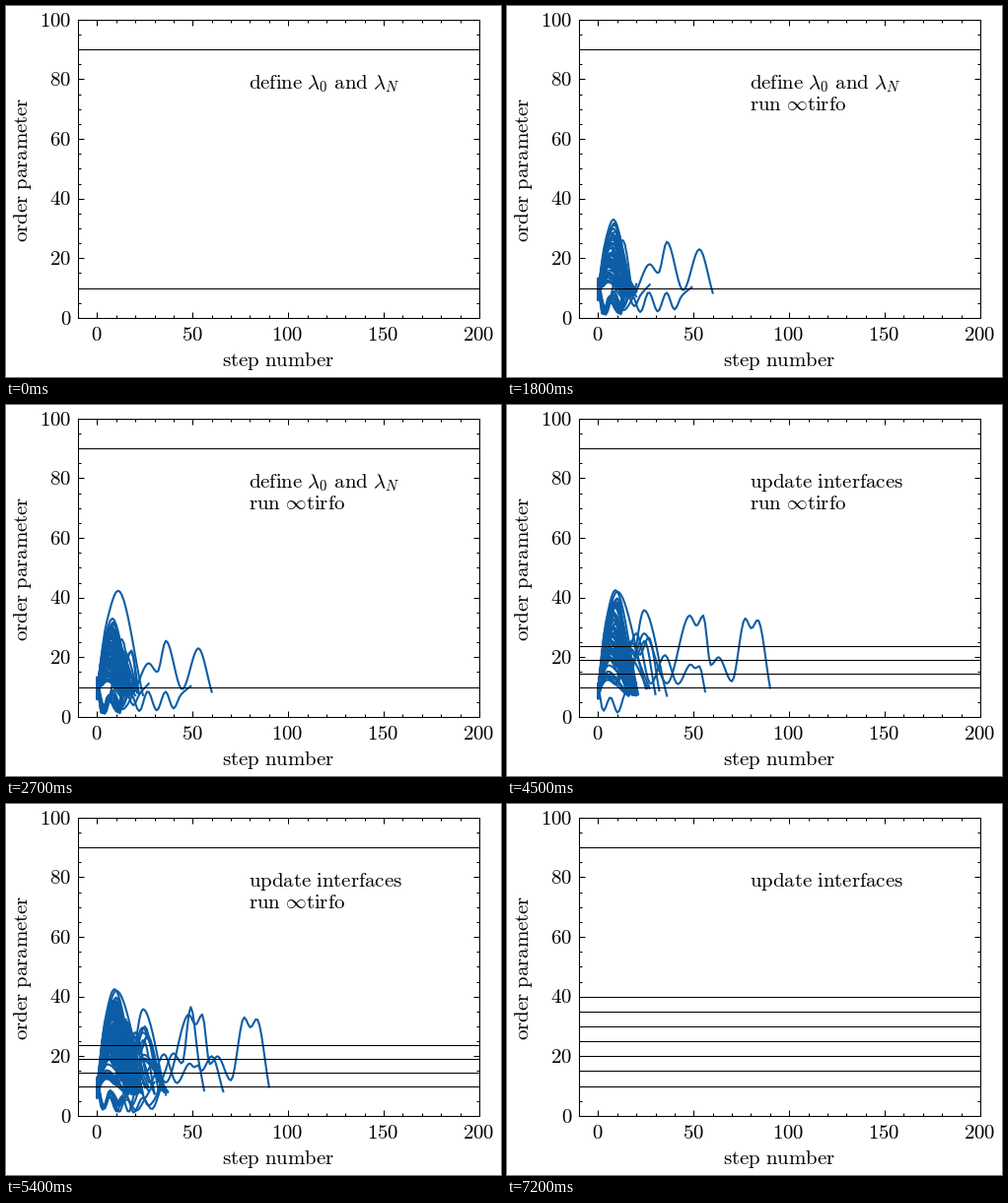
Animation of 502x377 px, one loop 8 s. Source, as a matplotlib script:

```python
import random

import numpy as np
import matplotlib.pyplot as plt
from matplotlib.animation import FuncAnimation
from matplotlib.ticker import MultipleLocator

W, H, DPI = 502, 377, 128
PT = 72 / DPI  # points per pixel
LEFT, RIGHT, TOP, BOTTOM = 73, 480, 13.9, 316.9
FONT = 20.83 * PT
BLUE = "#0C5DA5"
LOW, HIGH = 10, 90

plt.rcParams["mathtext.fontset"] = "cm"
plt.rcParams["mathtext.default"] = "rm"

rng = random.Random(11)


def smooth(knots):
    """Monotone cubic through the knots, sampled at every step."""
    x, y = np.array(knots, float).T
    h = np.diff(x)
    d = np.diff(y) / h
    same = d[:-1] * d[1:] > 0
    total = np.where(same, d[:-1] + d[1:], 1)
    inner = np.where(same, 2 * d[:-1] * d[1:] / total, 0)
    m = np.concatenate([d[:1], inner, d[-1:]])
    t = np.arange(x[0], x[-1] + 1)
    k = np.clip(np.searchsorted(x, t, side="right") - 1, 0, len(h) - 1)
    s = (t - x[k]) / h[k]
    value = ((1 + 2 * s) * (1 - s) ** 2 * y[k] + s * (1 - s) ** 2 * h[k] * m[k]
             + s * s * (3 - 2 * s) * y[k + 1] + s * s * (s - 1) * h[k] * m[k + 1])
    return t, value


def hill(end, *peaks):
    """Path over the given peaks; the wider the gap, the deeper the dip between."""
    x, top = peaks[0]
    knots = [(0, rng.uniform(6, 10)), (x * 0.45, top * 0.7 + 2), (x, top)]
    for (x0, y0), (x1, y1) in zip(peaks, peaks[1:]):
        depth = max(0.4, 1 - ((x1 - x0) / 22) ** 2)
        knots += [((x0 + x1) / 2, min(y0, y1) * depth), (x1, y1)]
    return knots + [(end, rng.uniform(7, 9.8))]


def random_hill(end, top):
    last = rng.randint(*end)
    height = rng.uniform(12, top)
    peaks = [(3 + height * rng.uniform(0.12, 0.19), height)]
    while last - peaks[-1][0] > 14:
        peaks.append((peaks[-1][0] + rng.uniform(8, 12), rng.uniform(0.5, 0.85) * top))
    return hill(last, *peaks)


def sag(end):
    """Path wobbling below the lowest interface."""
    knots, step = [(0, rng.uniform(10.5, 13.5))], rng.uniform(2, 4)
    low = True
    while step < end - 2:
        knots.append((step, rng.uniform(0.8, 4) if low else rng.uniform(5, 9)))
        low = not low
        step += rng.uniform(3, 5)
    return knots + [(end, rng.uniform(10.2, 11.5))]


def hills(n, end, top):
    return [random_hill(end, top) for _ in range(n)]


def sags(n, shortest, longest):
    return [sag(rng.randint(shortest, longest)) for _ in range(n)]


BATCHES = [
    hills(20, (12, 17), 27) + sags(5, 8, 17)
    + [hill(16, (9, 29)), hill(18, (13, 26)), sag(27), sag(49)],
    hills(20, (13, 20), 32) + sags(4, 8, 20)
    + [hill(17, (8, 33)), hill(60, (8, 30), (27, 18), (36, 25.5), (53, 23))],
    hills(18, (13, 22), 32) + [hill(24, (11, 42.3))],
    hills(46, (15, 20), 40) + hills(4, (22, 32), 33) + sags(1, 16, 20)
    + [hill(21, (9, 42.5)), hill(25, (10, 42)), hill(36, (8, 24), (24, 35.8)),
       hill(56, (7, 28), (20, 28), (35, 20.7), (48.5, 17.6), (53, 17)),
       hill(90, (10, 32), (24, 28), (48, 34), (55, 34), (63, 20), (77, 33), (83.5, 32.5))],
    hills(30, (16, 24), 39) + hills(8, (26, 38), 36) + sags(5, 12, 34)
    + [hill(66, (8, 30), (25, 30), (40, 21), (49, 36.5), (60, 20))],
    hills(30, (16, 26), 37) + hills(10, (28, 42), 36) + sags(5, 14, 55)
    + [sag(74), sag(84),
       hill(108, (7, 25), (21, 30), (36, 21), (46, 25), (61.5, 28), (79.5, 28), (87, 23),
            (99, 30))],
]

RUN = r"$run\ \infty{}tirfo$"
DEFINE = r"$define\ \lambda_0\ and\ \lambda_{\mathit{N}}$"
UPDATE = r"$update\ interfaces$"
START = [LOW]
FOUR = [LOW + 4.6 * k for k in range(4)]
SEVEN = [LOW + 5 * k for k in range(7)]

# heading, interfaces, visible batches
SCENES = [
    (DEFINE, START, ()),
    (DEFINE, START, (0,)),
    (DEFINE, START, (0, 1)),
    (DEFINE, START, (0, 1, 2)),
    (UPDATE, FOUR, ()),
    (UPDATE, FOUR, (3,)),
    (UPDATE, FOUR, (3, 4)),
    (UPDATE, FOUR, (3, 4, 5)),
    (UPDATE, SEVEN, ()),
]

fig = plt.figure(figsize=(W / DPI, H / DPI), dpi=DPI, facecolor="white")
ax = fig.add_axes([LEFT / W, 1 - BOTTOM / H, (RIGHT - LEFT) / W, (BOTTOM - TOP) / H])
ax.set(xlim=(-10, 200), ylim=(0, 100))
ax.xaxis.set_major_locator(MultipleLocator(50))
ax.xaxis.set_minor_locator(MultipleLocator(10))
ax.yaxis.set_major_locator(MultipleLocator(20))
ax.yaxis.set_minor_locator(MultipleLocator(5))
for kind, size in (("major", 6.25), ("minor", 3.12)):
    ax.tick_params(which=kind, direction="in", length=size * PT, width=1.04 * PT,
                   top=True, right=True, labelbottom=False, labelleft=False)
for spine in ax.spines.values():
    spine.set_linewidth(1.04 * PT)


def label(x, y, text, ha="center", **kw):
    """Text with its baseline at a pixel position counted from the top left."""
    return fig.text(x / W, 1 - y / H, text, ha=ha, va="baseline", fontsize=FONT, **kw)


for step in range(0, 201, 50):
    label(LEFT + (step + 10) * (RIGHT - LEFT) / 210 - 0.8, 340, f"${step}$")
for value in range(0, 101, 20):
    label(66.3, BOTTOM - value * (BOTTOM - TOP) / 100 + 6.7, f"${value}$", ha="right")
label((LEFT + RIGHT) / 2 - 1, 365.5, r"$step\ number$")
label(22.5, 166, r"$order\ parameter$", rotation=90, rotation_mode="anchor")

heading = label(246, 84.2, DEFINE, ha="left")
run_text = label(246, 106.4, RUN, ha="left")


def rule(value):
    return ax.axhline(value, color="black", lw=1.04 * PT, zorder=3)


rule(HIGH)
rules = [rule(v) for v in SEVEN]
curves = [[ax.plot(*smooth(k), color=BLUE, lw=2.08 * PT, zorder=2)[0] for k in batch]
          for batch in BATCHES]


def draw(i):
    title, levels, shown = SCENES[min(i // 9, len(SCENES) - 1)]
    heading.set_text(title)
    run_text.set_visible(bool(shown))
    for k, line in enumerate(rules):
        line.set_visible(k < len(levels))
        if k < len(levels):
            line.set_ydata([levels[k]] * 2)
    for k, batch in enumerate(curves):
        for curve in batch:
            curve.set_visible(k in shown)
    return []


anim = FuncAnimation(fig, draw, frames=80, interval=100, repeat=True, repeat_delay=0)
plt.show()
```
